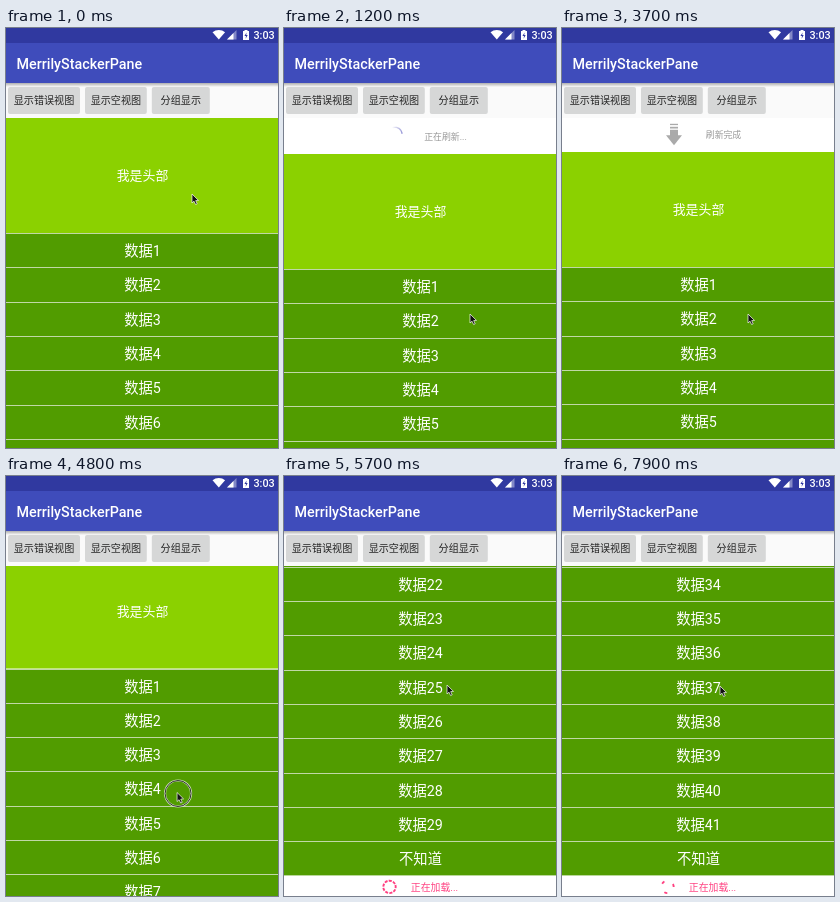
An HTML page with a canvas for the animation above (8 s loop, 272 px wide and 420 px high).

```html
<!DOCTYPE html>
<html lang="zh-CN">
<head>
<meta charset="utf-8">
<style>
html, body { margin: 0; width: 100%; height: 100%; overflow: hidden; background: #fafafa; }
canvas { display: block; }
</style>
</head>
<body>
<canvas id="stage" width="272" height="420"></canvas>
<script>
const W = 272, H = 420, LOOP = 8000, STEP = 100, TAU = Math.PI * 2;
const TOP = 90, HEADER = 115, ROW = 34.3, FOOTER = 20.6;
const PINK = '#ff4081';
const ctx = document.getElementById('stage').getContext('2d');

const maxScroll = n => HEADER + n * ROW + FOOTER - (H - TOP);
const END1 = maxScroll(30), END2 = maxScroll(42);

// Progress from 0 to 1 between two times
const ramp = (t, a, b) => Math.min(1, Math.max(0, (t - a) / (b - a)));
const smooth = (t, a, b) => { const p = ramp(t, a, b); return p * p * (3 - 2 * p); };
const easeOut = (t, a, b) => 1 - (1 - ramp(t, a, b)) ** 2;

// Negative while pulled down; each upward drag ends in a fling to the bottom
function scrollAt(t) {
  const pull = 60 * smooth(t, 200, 800) - 24 * smooth(t, 1000, 1200) - 36 * smooth(t, 3600, 4300);
  const first = 120 * smooth(t, 4700, 5200) + (END1 - 120) * easeOut(t, 5200, 5600);
  const second = 87 * smooth(t, 6200, 6500) + (END2 - END1 - 87) * easeOut(t, 6500, 6900);
  return first + second - pull;
}

function pointerAt(t) {
  return {
    x: 186 - 14 * smooth(t, 4100, 4600) - 9 * smooth(t, 4700, 5200)
      - 3 * smooth(t, 5800, 6500) - 2 * smooth(t, 7000, 7600),
    y: 166 + 120 * smooth(t, 200, 800) + 43 * smooth(t, 4100, 4600) - 120 * smooth(t, 4700, 5200)
      + 87 * smooth(t, 5700, 6100) - 87 * smooth(t, 6200, 6500)
      + 73 * smooth(t, 6600, 7200) - 72 * smooth(t, 7200, 7600),
    down: [200, 4700, 6200, 7200].some(p => t >= p && t < p + 200)
  };
}

function rect(x, y, w, h, color) {
  ctx.fillStyle = color;
  ctx.fillRect(x, y, w, h);
}

function text(str, x, y, size, color, align = 'center', weight = 400) {
  ctx.font = `${weight} ${size}px Roboto, "Noto Sans CJK SC", "Noto Sans CJK", sans-serif`;
  ctx.textAlign = align;
  ctx.fillStyle = color;
  ctx.fillText(str, x, y + size * 0.37);
}

function poly(points, color) {
  ctx.beginPath();
  points.forEach(p => ctx.lineTo(...p));
  ctx.closePath();
  ctx.fillStyle = color;
  ctx.fill();
}

function arc(x, y, r, from, to, color, width) {
  ctx.beginPath();
  ctx.arc(x, y, r, from, to);
  ctx.strokeStyle = color;
  ctx.lineWidth = width;
  ctx.stroke();
}

function signal(size, color) {
  poly([[221 + size, 11.5 - size], [221 + size, 11.5], [221, 11.5]], color);
}

function statusBar() {
  rect(0, 0, W, 15, '#3039a0');
  ctx.beginPath();
  ctx.moveTo(212.8, 11.5);
  ctx.arc(212.8, 11.5, 9.5, -Math.PI * 0.73, -Math.PI * 0.27);
  ctx.fillStyle = '#fff';
  ctx.fill();
  signal(9.5, 'rgba(255,255,255,.4)');
  signal(6.5, '#fff');
  rect(238.5, 2, 3, 1, '#fff');
  rect(237, 3, 6, 9, '#fff');
  poly([[240.6, 4.5], [238.4, 8], [240, 8], [239.6, 10.7], [241.7, 7], [240.2, 7]], '#3039a0');
  text('3:03', 268.7, 6.8, 10.8, '#fff', 'right', 500);
}

function appBar() {
  rect(0, 55, W, 35, '#fafafa');
  const shade = ctx.createLinearGradient(0, 55, 0, 59);
  shade.addColorStop(0, 'rgba(0,0,0,.3)');
  shade.addColorStop(1, 'rgba(0,0,0,0)');
  rect(0, 55, W, 4, shade);
  rect(0, 15, W, 40, '#3f4cbb');
  text('MerrilyStackerPane', 10.5, 36, 14.3, '#fff', 'left', 500);
  let x = 2;
  for (const label of ['显示错误视图', '显示空视图', '分组显示']) {
    const w = Math.max(58, label.length * 10.2 + 10.8);
    ctx.beginPath();
    ctx.roundRect(x, 59, w, 27, 2);
    ctx.fillStyle = '#d6d7d7';
    ctx.fill();
    text(label, x + w / 2, 72.5, 10.1, '#222');
    x += w + 5;
  }
}

function pullArrow(y, up) {
  ctx.save();
  ctx.translate(112, y);
  if (up) ctx.scale(1, -1);
  for (let i = 0; i < 3; i++) rect(-4, -10.5 + i * 3, 8, 1.3 + i * 0.4, '#aaa');
  rect(-4, -3, 8, 5, '#aaa');
  poly([[-8, 1], [8, 1], [0, 11]], '#aaa');
  ctx.restore();
}

function refreshBar(t, top, pull) {
  const y = top - 17.7, busy = t >= 1000 && t < 3500, ready = pull > 36;
  if (busy) {
    const end = (t - 1200) * 0.0063 - 0.1;
    for (let i = 0; i < 10; i++) {
      const a = end - 1.8 + i * 0.18;
      arc(111, y - 2, 7, a, a + 0.2, `rgba(125,125,205,${(i + 1) / 11})`, 1.3);
    }
  } else {
    pullArrow(y, t < 1000 && ready);
  }
  const label = busy ? '正在刷新...' : t >= 3500 ? '刷新完成' : ready ? '松开刷新' : '下拉刷新';
  text(label, 161.5, y, 8.9, '#999');
}

function footer(y, loadTime) {
  const cy = y + 11.5;
  rect(0, y, W, FOOTER + 1, '#fff');
  if (loadTime < 0) {
    text('上拉加载更多', 143.5, cy, 9.9, PINK);
    return;
  }
  const shown = 3 - Math.floor(loadTime / 150) % 3;
  for (let i = 0; i < 9; i++) {
    const a = i * TAU / 9 + loadTime * 0.004;
    if (i % 3 < shown) arc(105.5, cy, 6.2, a, a + 0.5, PINK, 1.9);
  }
  text('正在加载...', 150.5, cy, 9.9, PINK);
}

function glow(t) {
  const size = smooth(t, 6800, 7000) - smooth(t, 7500, 7800), r = 440;
  if (size <= 0) return;
  ctx.beginPath();
  ctx.arc(146, H - 49 * size + r, r, 0, TAU);
  ctx.fillStyle = `rgba(63,76,187,${0.5 * size})`;
  ctx.fill();
}

function list(t) {
  const scroll = scrollAt(t), top = TOP - scroll;
  const loaded = t >= 6100, count = loaded ? 42 : 30;
  const loadTime = t - (loaded ? 7500 : 5600);
  ctx.save();
  ctx.beginPath();
  ctx.rect(0, TOP, W, H - TOP);
  ctx.clip();
  rect(0, TOP, W, H - TOP, '#fff');
  if (scroll < 0) refreshBar(t, top, -scroll);
  rect(0, top, W, HEADER, '#8bd100');
  text('我是头部', 136.5, top + HEADER / 2, 12.9, '#fff');
  for (let i = 0; i < count; i++) {
    const y = Math.round(top + HEADER + i * ROW);
    if (y < TOP - ROW || y > H) continue;
    rect(0, y, W, ROW + 1, '#519c00');
    rect(0, y, W, 1, '#c0d8a6');
    const last = i === count - 1;
    const label = !last ? '数据' + (i + 1) : loaded && loadTime < 0 ? '数据31' : '不知道';
    text(label, 136.5, y + 17.5, 14.3, '#fff');
  }
  footer(top + HEADER + count * ROW, loadTime);
  glow(t);
  ctx.restore();
}

function pointer(t) {
  const { x, y, down } = pointerAt(t);
  if (down) {
    arc(x + 1, y + 1, 13, 0, TAU, 'rgba(255,255,255,.7)', 2.2);
    arc(x + 1, y + 1, 13, 0, TAU, '#333', 1);
  }
  ctx.save();
  ctx.translate(x, y);
  poly([[0, 0], [0, 9], [2, 7.2], [3.6, 10.5], [5.2, 9.8], [3.7, 6.6], [6.5, 6.4]], '#111');
  ctx.strokeStyle = 'rgba(255,255,255,.85)';
  ctx.lineWidth = 0.8;
  ctx.stroke();
  ctx.restore();
}

function tick() {
  const t = Math.floor(performance.now() % LOOP / STEP) * STEP;
  appBar();
  statusBar();
  list(t);
  pointer(t);
  requestAnimationFrame(tick);
}
tick();
</script>
</body>
</html>
```
